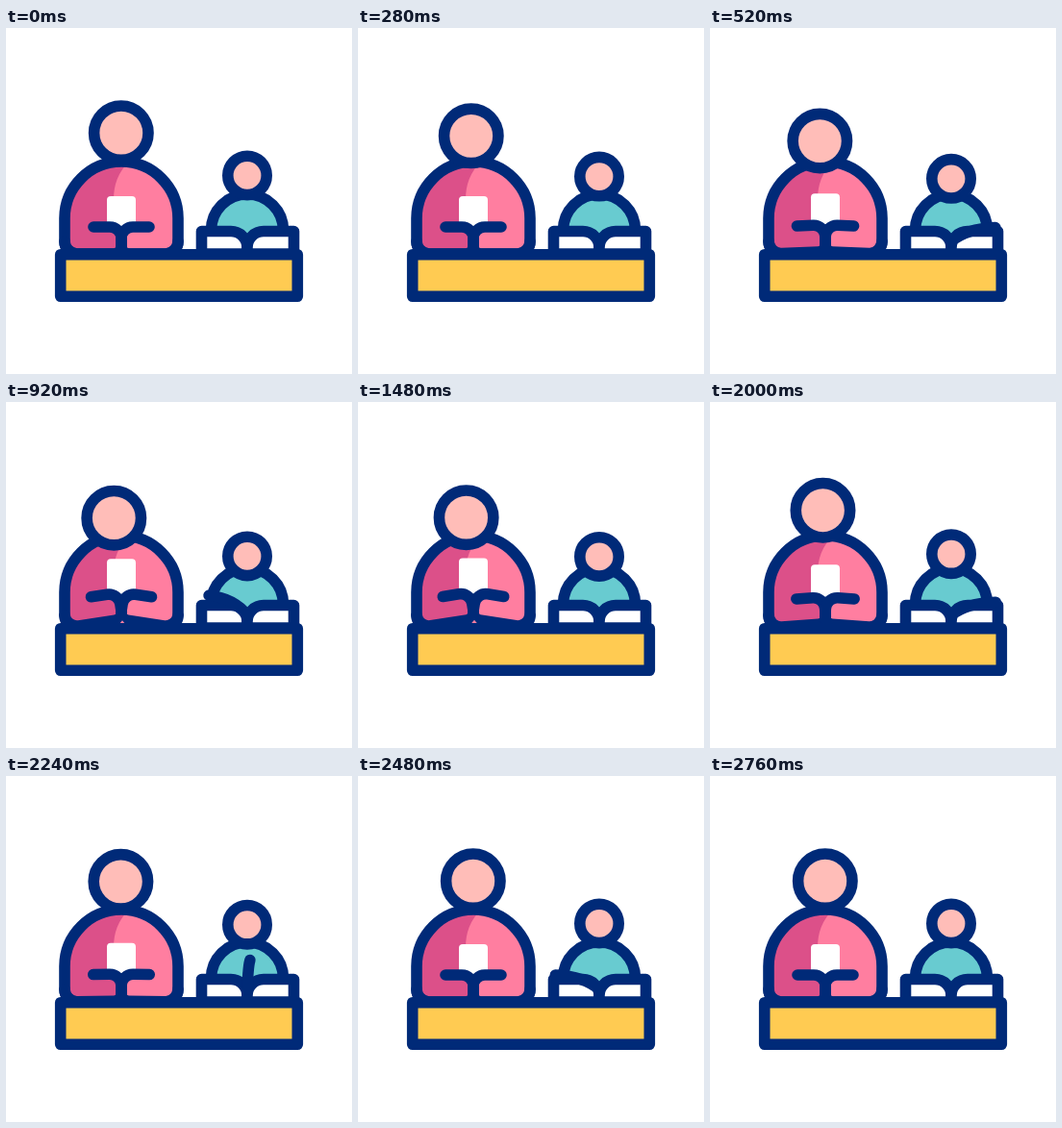
These frames come from a looping animation (360 by 360 pixels, 3 s). An HTML page:

```html
<!DOCTYPE html>
<html lang="en">
<head>
<meta charset="utf-8">
<title>Reading lesson</title>
<style>
html, body { margin: 0; width: 100%; height: 100%; overflow: hidden; background: #fff; }
svg { display: block; width: 100vw; height: 100vh; }
.line { fill: none; }
.plain { stroke: none; }
</style>
</head>
<body>
<svg viewBox="0 0 360 360" stroke="#002a78" stroke-width="11.600" stroke-linecap="round" stroke-linejoin="round">
  <defs>
    <path id="torso" d="M61 198A59 59 0 0 1 179 198V222A13 13 0 0 1 166 235H74A13 13 0 0 1 61 222Z"/>
    <clipPath id="inside"><use href="#torso"/></clipPath>
  </defs>

  <!-- adult -->
  <g class="plain" clip-path="url(#inside)">
    <rect x="50" y="130" width="140" height="110" fill="#dc5089"/>
    <path d="M129 138Q112 154 112 178L120 215V240H190V130Z" fill="#ff7ea0"/>
  </g>
  <path id="paper" class="plain" fill="#fff" d="M109 175H131Q135 175 135 179V206L120 217L105 206V179Q105 175 109 175Z"/>
  <use href="#torso" fill="none"/>
  <path id="left" class="line" d="M91 207H108A12 12 0 0 1 120 219V227A8 8 0 0 1 112 235H74A13 13 0 0 1 61 222"/>
  <path id="right" class="line" d="M149 207H132A12 12 0 0 0 120 219V227A8 8 0 0 0 128 235H166A13 13 0 0 0 179 222"/>
  <path id="gap" class="plain" fill="#ff7ea0"/>
  <circle id="adultHead" r="28.200" fill="#ffbdb8"/>

  <!-- child -->
  <path d="M213.500 215V210.500A37.500 37.500 0 0 1 288.500 210.500V215" fill="#68cbd0"/>
  <circle id="childHead" cx="251" r="20.200" fill="#ffbdb8"/>
  <g fill="#fff">
    <path d="M251 235V228.500A17 17 0 0 0 234 211.500H203.500V235Z"/>
    <path d="M251 235V228.500A17 17 0 0 1 268 211.500H299.500V235Z"/>
  </g>
  <path id="page" class="line"/>

  <rect x="56.700" y="235.700" width="246.600" height="43.600" fill="#ffcb52"/>
</svg>
<script>
const LOOP = 3000;
const $ = id => document.getElementById(id);
const set = (id, attrs) => {
  for (const key in attrs) $(id).setAttribute(key, attrs[key]);
};
const ease = (t, from, to) => {
  const u = Math.min(1, Math.max(0, (t - from) / (to - from)));
  return (1 - Math.cos(Math.PI * u)) / 2;
};

// The page tip travels along a flat ellipse from right to left.
function turnPage(t) {
  const start = t < 1500 ? 400 : 1890;
  const u = ease(t, start, start + 720);
  const cos = Math.cos(Math.PI * u);
  const sin = Math.sin(Math.PI * u);
  const bend = `${251 + 16 * cos} ${212 - 15 * sin}`;
  const tip = `${251 + 47 * cos} ${212 - 20.5 * sin}`;
  set('page', {
    d: `M251 222Q${bend} ${tip}`,
    visibility: u > 0 && u < 1 ? 'visible' : 'hidden'
  });
}

function draw(t) {
  const nod = ease(t, 0, 800) - ease(t, 1340, 2400);
  const lift = ease(t, 280, 1040) - ease(t, 1519, 2426);
  const dip = ease(t, 0, 1100) - ease(t, 1690, 2450);

  set('adultHead', { cx: 119.8 - 7.5 * nod, cy: 109.2 + 11.5 * nod });
  set('childHead', { cy: 153.4 + 7.5 * dip });
  set('paper', { transform: `translate(0 ${-12.5 * lift})` });
  set('left', { transform: `rotate(${-9 * lift} 61 222)` });
  set('right', { transform: `rotate(${9 * lift} 179 222)` });
  const gap = Math.max(0, lift - 0.6) * 9;
  set('gap', { d: `M${121 - gap} 231L121 ${231 - gap * 1.2}L${121 + gap} 231Z` });
  turnPage(t);
}

function tick() {
  draw(performance.now() % LOOP);
  requestAnimationFrame(tick);
}
tick();
</script>
</body>
</html>
```
